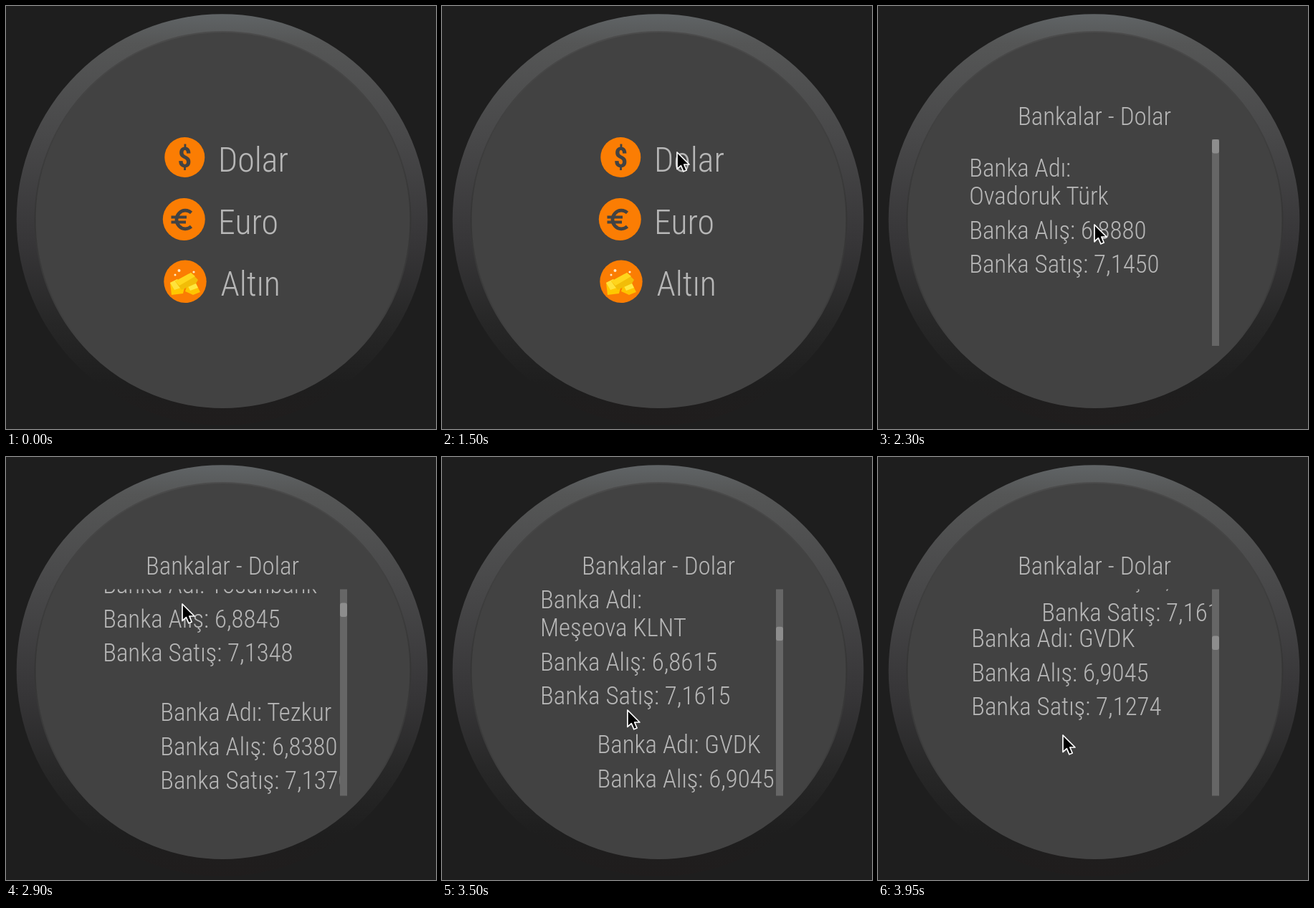
These frames come from a looping animation (600x590 px, 4000 ms). An HTML page:

```html
<!DOCTYPE html>
<html lang="tr">
<head>
<meta charset="utf-8">
<title>Bankalar</title>
<style>
  html, body { margin: 0; width: 100%; height: 100%; overflow: hidden; background: #1e1e1e; }
  svg { display: block; width: 600px; height: 590px; }
  text { font-family: "Roboto Condensed", Roboto, sans-serif; font-stretch: condensed; font-weight: 300; fill: #b7b7b7; white-space: pre; }
</style>
</head>
<body>
<svg id="stage" viewBox="0 0 600 590">
  <defs>
    <linearGradient id="rim" x1="0" y1="0" x2="0" y2="1">
      <stop offset="0" stop-color="#606466"/>
      <stop offset=".07" stop-color="#555656"/>
      <stop offset=".3" stop-color="#484849"/>
      <stop offset=".55" stop-color="#373638"/>
      <stop offset=".75" stop-color="#272727"/>
      <stop offset=".9" stop-color="#1e1e1e"/>
      <stop offset="1" stop-color="#201d1d"/>
    </linearGradient>
    <linearGradient id="lip" x1="0" y1="0" x2="0" y2="1">
      <stop offset="0" stop-color="#4b4b4b"/>
      <stop offset=".5" stop-color="#353535"/>
      <stop offset=".85" stop-color="#424242"/>
    </linearGradient>
    <clipPath id="window"><rect x="100" y="184.5" width="376" height="288"/></clipPath>
  </defs>

  <rect width="600" height="590" fill="#1e1e1e"/>
  <circle cx="301.5" cy="298" r="286.8" fill="url(#rim)"/>
  <circle cx="302.5" cy="298" r="262" fill="#424242" stroke="url(#lip)" stroke-width="2"/>

  <g id="menu">
    <g fill="#fb7d03">
      <circle cx="249.3" cy="211" r="28"/>
      <circle cx="248.3" cy="297.5" r="29.5"/>
      <circle cx="250" cy="384.3" r="29.7"/>
    </g>
    <g fill="none" stroke="#424242" stroke-width="4.8">
      <path d="M258.5 288.5A12.3 12.8 0 1 0 258.5 307.5"/>
      <path d="M230.5 294.6H252M230.5 301.6H251" stroke-width="4"/>
    </g>
    <g>
      <path d="M229 386L239 381L249 393L247 401L231 403Z" fill="#ffc800"/>
      <path d="M229 386L239 381L247 392L235 396Z" fill="#ffe23c"/>
      <path d="M253 389L265 387L271 399L261 403L250 398Z" fill="#ffc400"/>
      <path d="M253 389L265 387L268 393L257 397Z" fill="#ffe840"/>
      <path d="M236 384L258 372L268 382L265 387L245 396Z" fill="#f2bd08"/>
      <path d="M236 384L258 372L264 377L242 390Z" fill="#ffd51c"/>
      <g fill="#ffe9c4">
        <circle cx="241.5" cy="369" r="2"/><circle cx="236" cy="375" r="1.5"/><circle cx="262" cy="371" r="1.6"/>
      </g>
    </g>
  </g>

  <g id="page">
    <g clip-path="url(#window)" id="list"></g>
    <rect x="466" y="184.5" width="10" height="288" fill="#666"/>
    <rect id="thumb" x="466" width="10" height="19.5" rx="3" fill="#8d8d8d"/>
  </g>

  <path id="cursor" d="M0 0V23.5L5.4 18.6L9 26.8L13.2 25L9.8 17H17Z" fill="#000" stroke="#fff" stroke-width="1.7" stroke-linejoin="round"/>
</svg>
<script>
const LOOP = 4000, STEP = 50;
const $ = id => document.getElementById(id);

function node(tag, attrs, parent) {
  const el = document.createElementNS('http://www.w3.org/2000/svg', tag);
  for (const key in attrs) el.setAttribute(key, attrs[key]);
  return parent.appendChild(el);
}

// One ratio for all type: narrows a regular-width face when no condensed one exists.
const DIGIT_ADVANCE = 0.485;
const probe = node('text', { 'font-size': 100 }, $('stage'));
probe.textContent = '0000000000';
const narrow = Math.min(1, DIGIT_ADVANCE * 1000 / probe.getComputedTextLength());
probe.remove();

function label(parent, text, x, y, size, attrs = {}) {
  const el = node('text', {
    'font-size': size, transform: `translate(${x} ${y}) scale(${narrow} 1)`, ...attrs
  }, parent);
  el.textContent = text;
  return el;
}

const menu = $('menu'), page = $('page');
label(menu, '$', 249.3, 225, 39, { 'text-anchor': 'middle', style: 'font-weight:700;fill:#424242' });
label(menu, 'Dolar', 296, 231, 48);
label(menu, 'Euro', 296, 318, 48);
label(menu, 'Altın', 299.5, 404, 48);
label(page, 'Bankalar - Dolar', 302, 164, 35, { 'text-anchor': 'middle' });

// Each path lists [scroll, x, first baseline] along the curved layout.
const banks = [
  { name: 'Ovadoruk Türk', wrap: true, buy: '6,8880', sell: '7,1450',
    path: [[0, 130, 236.5], [9, 146, 140], [19, 235, 10]] },
  { name: 'Yosunbank', buy: '6,8845', sell: '7,1348',
    path: [[0, 300, 500], [10, 190, 332], [15, 143, 252], [19, 138, 190], [30, 205, 75], [41, 260, -60]] },
  { name: 'Tezkur', buy: '6,8380', sell: '7,1370',
    path: [[0, 400, 640], [19, 218, 368], [29, 134, 262], [35, 136, 204], [41, 161, 149], [57, 300, -40]] },
  { name: 'Meşeova KLNT', wrap: true, buy: '6,8615', sell: '7,1615',
    path: [[19, 300, 560], [30, 245, 440], [41, 177, 340], [49, 131, 245], [57, 153, 160.5], [65, 231, 95]] },
  { name: 'GVDK', buy: '6,9045', sell: '7,1274',
    path: [[41, 290, 560], [57, 189, 350], [65, 133, 265]] }
];

for (const bank of banks) {
  bank.group = node('g', {}, $('list'));
  const lines = bank.wrap ? ['Banka Adı:', bank.name] : ['Banka Adı: ' + bank.name];
  lines.forEach((line, i) => label(bank.group, line, 0, i * 39, 35));
  const top = bank.wrap ? 39 : 0;
  label(bank.group, 'Banka Alış: ' + bank.buy, 0, top + 47.5, 35);
  label(bank.group, 'Banka Satış: ' + bank.sell, 0, top + 95, 35);
}

const pointer = [
  [50, 256, 197], [300, 196, 360], [550, 104, 524], [850, 359, 91], [1100, 229, 372],
  [1500, 328, 204], [1650, 326, 196], [1850, 328, 210], [2300, 302, 305], [2500, 266, 390],
  [2680, 262, 390], [2900, 246, 205], [3120, 260, 390], [3250, 258, 328], [3380, 247, 205],
  [3550, 262, 392], [3700, 246, 217], [3900, 258, 385], [3950, 258, 388]
];
const scrolling = [[2650, 0], [2750, 5], [2900, 19], [3100, 34], [3250, 41], [3450, 51], [3700, 57], [3950, 65]];

const clamp = v => Math.max(0, Math.min(1, v));
const smooth = v => v * v * (3 - 2 * v);
const linear = v => v;

function along(points, at, ease = linear) {
  let i = 1;
  while (i < points.length - 1 && at > points[i][0]) i++;
  const a = points[i - 1], b = points[i];
  const k = ease(clamp((at - a[0]) / (b[0] - a[0])));
  return a.slice(1).map((v, n) => v + (b[n + 1] - v) * k);
}

const move = (el, x, y) => el.setAttribute('transform', `translate(${x} ${y})`);

function render(t) {
  const shown = clamp((t - 2100) / 100);
  menu.setAttribute('opacity', 1 - shown);
  page.setAttribute('opacity', shown);
  move(page, 0, t < 2500 ? 22 * Math.exp((2150 - t) / 56) : 0);

  const [scroll] = along(scrolling, t);
  $('thumb').setAttribute('y', 184.5 + scroll);
  for (const { group, path } of banks) {
    const [x, y] = along(path, scroll);
    move(group, x - 2.8, y);
    const visible = scroll >= path[0][0] && scroll <= path[path.length - 1][0];
    group.setAttribute('visibility', visible ? 'visible' : 'hidden');
  }

  $('cursor').setAttribute('visibility', t < 50 ? 'hidden' : 'visible');
  move($('cursor'), ...along(pointer, t, smooth));
}

const start = performance.now();
function tick() {
  const t = (performance.now() - start) % LOOP;
  render(Math.floor(t / STEP) * STEP);
  requestAnimationFrame(tick);
}
tick();
</script>
</body>
</html>
```
